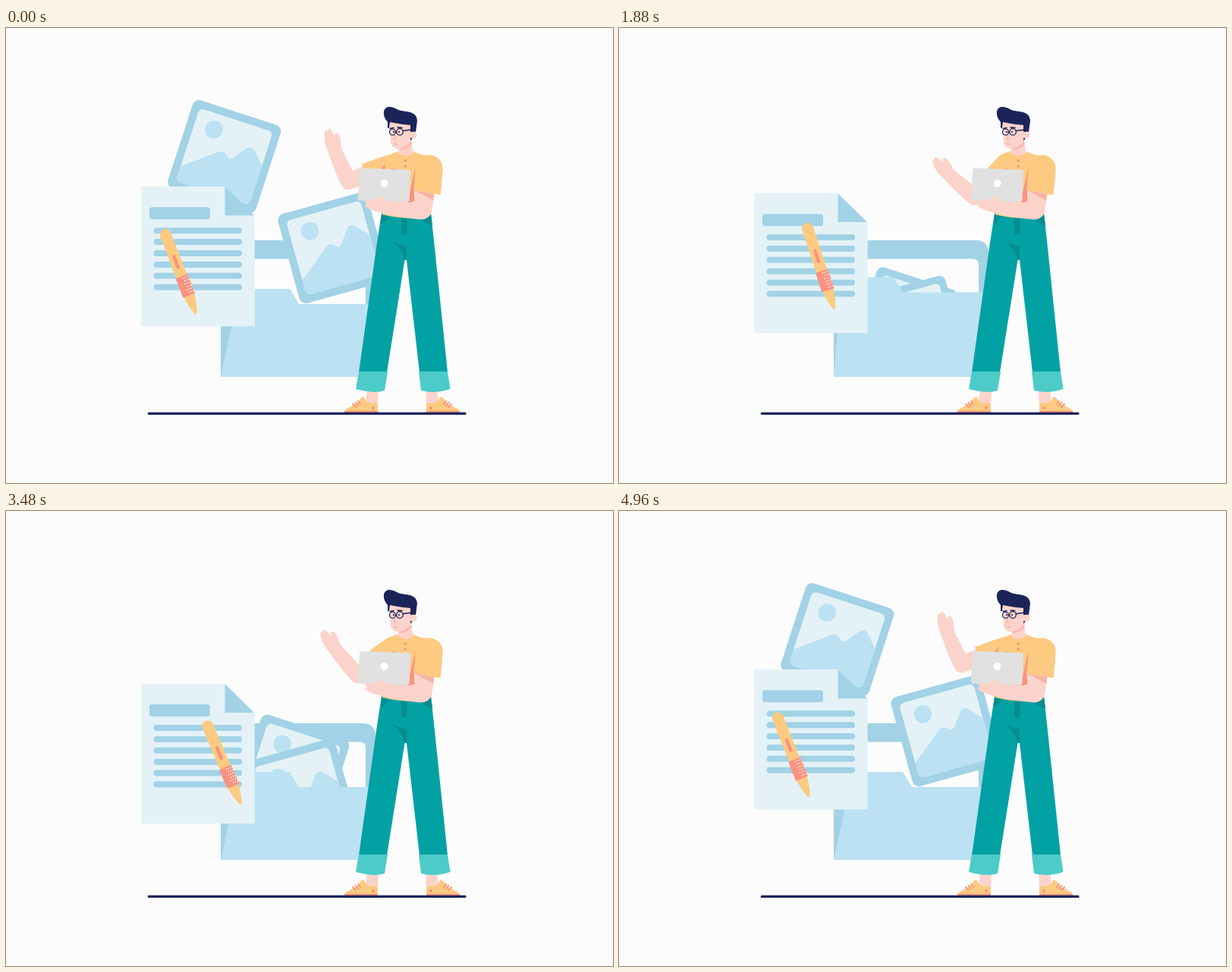
An HTML page for the animation above (5 s loop, 800 by 600 pixels).

```html
<!DOCTYPE html>
<html lang="en">
<head>
<meta charset="utf-8">
<title>Filing documents</title>
<style>
  html, body { margin: 0; width: 100%; height: 100%; overflow: hidden; background: #fcfcfc; }
  svg { display: block; width: 800px; height: 600px; }
  .mid { fill: #a2d2e6; }
  .soft { fill: #bbe1f3; }
  .pale { fill: #e4f2f7; }
  .skin { fill: #fcd3ca; }
  .gold { fill: #fcca80; }
  .coral { fill: #fa9280; }
  .navy { fill: #1b2459; }
  .teal { fill: #02a1a4; }
  .deep { fill: #078c90; }
  .cuff { fill: #4dcbc9; }
  .line { fill: none; stroke-linecap: round; stroke-linejoin: round; }
</style>
</head>
<body>
<svg viewBox="0 0 800 600">
  <defs>
    <clipPath id="inner"><rect x="-51" y="-51" width="102" height="102" rx="7"/></clipPath>
    <g id="photo">
      <rect class="mid" x="-61" y="-61" width="122" height="122" rx="9"/>
      <g clip-path="url(#inner)">
        <rect class="pale" x="-51" y="-51" width="102" height="102"/>
        <circle class="soft" cx="-24" cy="-29.6" r="11.8"/>
        <path class="soft" d="M-52 31L-10-3Q-4-8 2-3L4-1Q8 2 12-3L24-19Q30-26 36-19L52-3V52H-52Z"/>
      </g>
    </g>
    <g id="shoe">
      <path class="gold" d="M446 505.5C449 499 460 500 466 490Q469 485 472 487Q475 495 482 495Q489 493 490 497V505.5Z"/>
      <path class="coral" d="M446 505H490V507.5H445.5Z"/>
      <circle class="coral" cx="484" cy="501" r="2"/>
      <path class="line" stroke="#fa9280" stroke-width="1.8" d="M457 496L461 500M460.5 494L464 498M464 492L467 496"/>
    </g>
  </defs>

  <path class="mid" fill-rule="evenodd" d="M283 280H470Q487 280 487 297V460H283ZM303 304.5V380H474V312Q474 304.5 466 304.5Z"/>
  <use id="photoA" href="#photo"/>
  <use id="photoB" href="#photo"/>
  <path id="front" class="soft"/>

  <g id="doc">
    <path class="mid" d="M288 209L327.5 247.5H288Z"/>
    <path class="pale" d="M178 209H288.5V247.5H327.7V393.5H178Z"/>
    <rect class="mid" x="189" y="236.3" width="80" height="16" rx="3.5"/>
    <g id="rows" class="mid"></g>
  </g>

  <g id="pen">
    <path class="gold" d="M-7.5-52V-112A7.5 7.5 0 0 1 7.5-112V-52Z"/>
    <path class="gold" d="M-7.5-27Q-6-12-1.6-1Q0 1 1.6-1Q6-12 7.5-27Z"/>
    <rect class="coral" x="-8.5" y="-53" width="17" height="27" rx="1"/>
    <path class="line" stroke="#fa9280" stroke-width="4.4" d="M0-81V-66"/>
    <g id="dots" fill="#fff"></g>
  </g>

  <!-- raised arm -->
  <path id="upper" class="line" stroke="#fcd3ca" stroke-width="23"/>
  <path id="fore" class="skin" d="M446 212C440 206 434 190 422 156C419 148 420 143 420 137Q421 134 423.5 135.5Q425 131 428 134L430 137Q432 141 433.5 143Q433 138 437 138Q441 143 441 150Q441 156 443 161L457 189L466 200L455 213Q449 214 446 212Z"/>

  <!-- ankles and shoes -->
  <path class="skin" d="M476 477H491L490 496H474ZM553 477H568L570 496H554Z"/>
  <use href="#shoe"/>
  <use href="#shoe" transform="matrix(-1 0 0 1 1044 0)"/>

  <!-- trousers -->
  <path class="teal" d="M495 244L489 283L465 454H502L525.5 306H528L545 454H582L565 290L560 244Z"/>
  <path class="deep" d="M495 246H505Q502 256 494 258ZM549 253L560 246L562 260Q553 259 549 253ZM521 250H528.5V268Q527 274 521 272ZM508 281Q519 286 528 288V305H525Q523 291 508 281Z"/>
  <path class="cuff" d="M465 453H503L499 478Q486 483 461 476ZM544 453H582L585.5 476Q566 483 547 478Z"/>

  <!-- shirt -->
  <path id="sleeve" class="gold"/>
  <path class="gold" d="M516 163Q527 173 537 163L549 167.5H560Q576 171 575.5 187L572.5 220L537 214L545 251.5Q515 251 496 246L500 169Z"/>
  <path class="coral" d="M540 183L529 230H538V210Z"/>
  <path class="coral" d="M502 187Q512 183.5 520 188Z"/>
  <path id="fold" class="coral" d="M499.5 180L494 187H500Z"/>
  <circle class="coral" cx="526.3" cy="175" r="1.8"/>
  <circle class="coral" cx="526.3" cy="182.3" r="1.8"/>

  <!-- head -->
  <path class="skin" d="M519 150H535V160L538 164Q527 173 515.5 164L519 160Z"/>
  <path fill="#f8b8ad" d="M517 159Q528 158 534 149V154Q528 161 518 161Z"/>
  <path class="skin" d="M506 123L507 152Q509 159 517 159Q528 158 534 148L540 123Z"/>
  <path class="navy" d="M503 132V124Q497 118 498 110C500 102 508 103 515 107C523 112 541 107 542 122L540 137H533V128Q520 127 506 124L505 132ZM533 145H535.5L533.5 149Z"/>
  <ellipse class="skin" cx="537.5" cy="141" rx="4" ry="4.5"/>
  <g class="line" stroke="#1b2459" stroke-width="1.3">
    <circle cx="509.5" cy="137.2" r="4"/>
    <circle cx="519" cy="137" r="4.3"/>
    <path d="M523.5 135.5L535 134M506 132.5L511 131.5M516 131L522 131.5"/>
  </g>
  <circle class="navy" cx="511" cy="137" r="1.1"/>
  <circle class="navy" cx="518" cy="137" r="1.1"/>
  <path class="line" stroke="#f2a397" stroke-width="1" d="M513 140L511.5 146.5H513.5M511.5 152.5L515.5 153.5"/>

  <!-- laptop -->
  <path fill="#e1e1e1" d="M469 184.7L530.5 187Q533.5 187 533.3 190L531.5 227Q531 229.5 528 229.5L466 227.5Q463.8 227 464 224L466 187Q466.5 184.6 469 184.7Z"/>
  <circle cx="498.5" cy="205" r="5" fill="#fff"/>

  <!-- holding arm -->
  <path class="skin" d="M538 213L564.5 218L561 243Q557 253 546 252.5C525 250 505 248 492 243Q480 240 474 236Q472 233 475 233.5L474 230Q473 227 477 227L490 225.5L493 222Q498 224 503 228.5L534 230L540 227Z"/>
  <path fill="#f7b3a7" d="M538 214L564.5 219L563 227.5Z"/>
  <path class="gold" d="M540 185L575.5 187L572.5 220L537 214Z"/>

  <path class="line" stroke="#1b2459" stroke-width="3.2" d="M188.3 508.4H605"/>
</svg>

<script>
const LOOP = 5000, HALF = LOOP / 2, STEP = 40;
const $ = id => document.getElementById(id);
const mix = (a, b, k) => a + (b - a) * k;

// 0 to 1 between two times along cubic-bezier(x1, 0, x2, 1)
function ease(t, from, to, x1 = 1 / 3, x2 = 2 / 3) {
  const u = Math.min(1, Math.max(0, (t - from) / (to - from)));
  let low = 0, high = 1, s = u;
  for (let i = 0; i < 20; i++) {
    s = (low + high) / 2;
    const x = 3 * s * (1 - s) * ((1 - s) * x1 + s * x2) + s ** 3;
    if (x < u) low = s; else high = s;
  }
  return s * s * (3 - 2 * s);
}

function addMany(id, count, draw) {
  $(id).innerHTML = Array.from({ length: count }, (_, i) => draw(i)).join('');
}
addMany('rows', 6, i => `<rect x="194.5" y="${263.2 + i * 14.9}" width="116.5" height="8" rx="4"/>`);
addMany('dots', 18, i => {
  const row = Math.floor(i / 3);
  return `<circle cx="${.5 + i % 3 * 3 + row % 2 * 1.5}" cy="${-50 + row * 4}" r=".8"/>`;
});

const place = (id, value) => $(id).setAttribute('transform', value);
const shape = (id, d) => $(id).setAttribute('d', d);

function movePaper(t) {
  const phase = t % HALF;
  const drop = 19 * (ease(phase, 0, 1040) - ease(phase, 1200, HALF));
  place('doc', `translate(0 ${drop})`);

  // the pen leaves its rest, writes in shrinking loops and returns in an arc
  const w = Math.min(1, Math.max(0, (t - 800) / 2600));
  const turn = 4.4 * Math.PI * w;
  const home = 1 - ease(t, 400, 880) + ease(t, 3500, 4500);
  const x = mix(268 + 41.5 * w + 5 * (1 - w) * Math.sin(turn), 250.5, home);
  const y = mix(366 + 2 * w - 10 * (1 - w) * Math.cos(turn), 377, home) - 14 * Math.sin(Math.PI * home);
  const tilt = 21 + 7 * Math.sin(3 * Math.PI * t / LOOP);
  place('pen', `translate(${x} ${y + drop}) rotate(${-tilt})`);
}

// The second half of the loop plays the first half backwards.
function moveFolder(t) {
  const m = Math.min(t, LOOP - t);
  const slide = ease(m, 690, 1490);
  const fall = ease(m, 680, 2400, .4, .2);
  const scale = 1 - .16 * ease(m, 1500, 2200);
  const photo = (id, x, y, dx, dy, angle) =>
    place(id, `translate(${x + dx * slide} ${y + dy * fall}) rotate(${angle}) scale(${scale})`);
  photo('photoA', 287.8, 169.6, 90, 228, 18);
  photo('photoB', 431.5, 290, -42, 110, -15.5);

  const open = 1 - ease(m, 1560, 2160);
  const top = 316 + 28 * open, lean = 22 * open;
  shape('front', `M283 460L${283 + lean * 1.15} ${top}H${352 + lean}L${364 + lean} ${top + 20}H${487 + lean}L487 460Z`);
}

function moveArm(t) {
  const p = ease(t, 0, 2300) - ease(t, 2380, 4960);
  const ex = 19 * p, ey = 22 * p;
  place('fore', `translate(${ex} ${ey}) rotate(${-27 * p} 453 203)`);
  shape('upper', `M${457 + ex} ${200 + ey}L498 ${185 + 10 * p}`);
  const hx = 469 + 18 * p, hy = 179.5 + 7 * p;
  shape('sleeve', `M518 162L${508 - 4 * p} 166.5Q${497 + 3 * p} ${168.5 + p} ${hx} ${hy}L${hx + 4} ${hy + 15}L515 210Z`);
  $('fold').setAttribute('opacity', Math.max(0, 1 - 3 * p));
}

const start = performance.now();
function tick() {
  const t = Math.floor((performance.now() - start) % LOOP / STEP) * STEP;
  movePaper(t);
  moveFolder(t);
  moveArm(t);
  requestAnimationFrame(tick);
}
tick();
</script>
</body>
</html>
```
